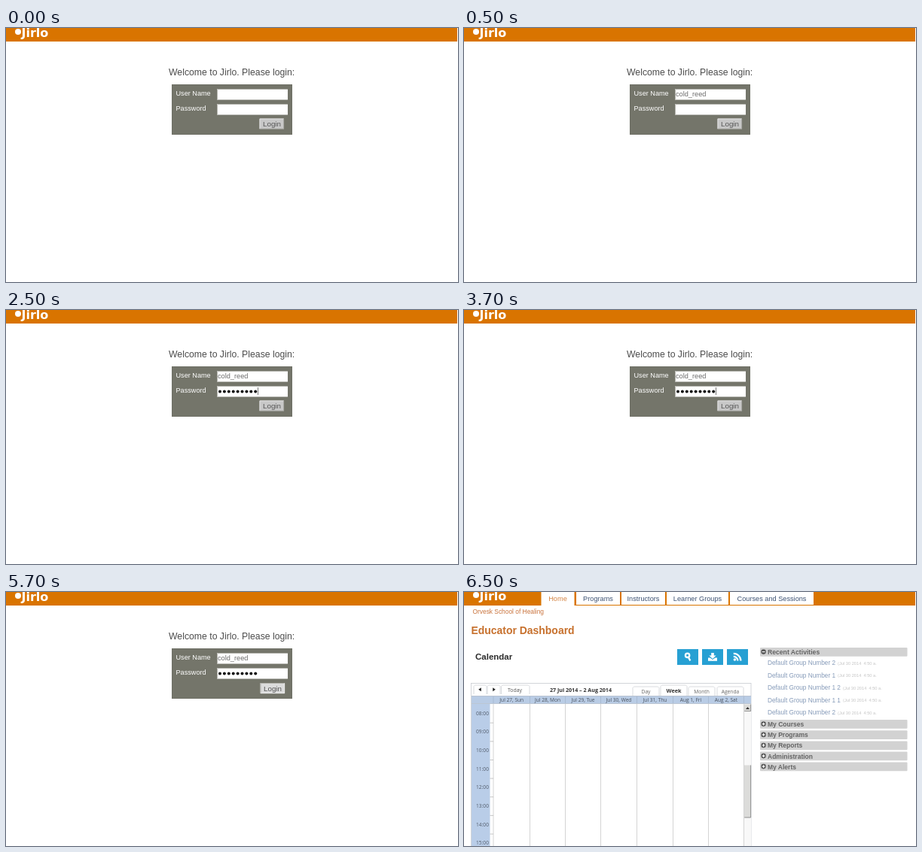
An HTML page that plays this animation: 600 px wide and 338 px high, repeating every 8000 ms.

```html
<!DOCTYPE html>
<html lang="en">
<head>
<meta charset="utf-8">
<title>Login walkthrough</title>
<style>
  html, body { margin: 0; width: 100%; height: 100%; overflow: hidden; background: #fff; }
  svg { display: block; width: 100%; height: 100%; }
  text { font-family: "Liberation Sans", Arial, sans-serif; white-space: pre; }
  .cal { font-family: "Open Sans", Tahoma, sans-serif; }
  .brand { font-family: "DejaVu Sans", Verdana, sans-serif; }
</style>
</head>
<body>
<svg id="stage" viewBox="0 0 600 338" xmlns="http://www.w3.org/2000/svg"></svg>
<script>
const NS = "http://www.w3.org/2000/svg";
const LOOP = 8000;
const stage = document.getElementById("stage");

function add(parent, tag, attrs = {}) {
  const el = document.createElementNS(NS, tag);
  for (const key in attrs) el.setAttribute(key, attrs[key]);
  parent.appendChild(el);
  return el;
}
const group = (parent, attrs) => add(parent, "g", attrs);
const rect = (p, x, y, w, h, fill, more) => add(p, "rect", { x, y, width: w, height: h, fill, ...more });
const path = (p, d, attrs) => add(p, "path", { d, fill: "none", ...attrs });
const line = (p, d, stroke, width = 1) => path(p, d, { stroke, "stroke-width": width });
const dot = (p, cx, cy, r, fill) => add(p, "circle", { cx, cy, r, fill });
function label(p, x, y, size, fill, str, more) {
  const el = add(p, "text", { x, y, "font-size": size, fill, ...more });
  el.textContent = str;
  return el;
}
const BOLD = { "font-weight": 700 };
const MID = { "text-anchor": "middle" };
const CAL = { class: "cal" };

// Shared header
rect(stage, 0, 0, 600, 338, "#fff");
rect(stage, 0, 0, 599, 18, "#d97400");
const brand = group(stage);
dot(brand, 16, 5, 4, "#fff");
label(brand, 20.5, 12, 16, "#fff", "Jirlo", { ...BOLD, class: "brand" });

// Login form
const login = group(stage);
label(login, 216, 63, 12.25, "#4c4c4c", "Welcome to Jirlo. Please login:");
rect(login, 220.5, 75.5, 159, 66, "#74756a", { stroke: "#6f7066" });
label(login, 225.5, 90, 9.15, "#fff", "User Name");
label(login, 225.5, 110, 9.15, "#fff", "Password");

function field(y) {
  rect(login, 280, y, 94, 14.5, "#fff");
  line(login, `M280.5 ${y + 14.5}V${y + 0.5}H374`, "#b4b4ae");
}
field(81);
field(101);

const userText = label(login, 281, 91.3, 9.2, "#6b6b6b", "cold_reed");
const secret = group(login);
for (let i = 0; i < 9; i++) dot(secret, 284 + i * 5.9, 108.6, 2, "#111");
const caret = line(login, "M334.5 103V113", "#555", 0.8);

const button = group(login);
const buttonFace = rect(button, 336.5, 120.5, 32.5, 14, "#c8c8c8");
const buttonLight = line(button, "M337 134V121H368.5", "#e0e0e0");
const buttonDark = line(button, "M337 134.2H368.7V121", "#9a9a94", 0.8);
label(button, 341, 131.3, 9.8, "#555", "Login");

// Dashboard
const dash = group(stage);
const tabs = [
  ["Home", 102.5, 146.5], ["Programs", 149, 207], ["Instructors", 209, 267],
  ["Learner Groups", 269, 351], ["Courses and Sessions", 353, 464]
];
tabs.forEach(([name, x0, x1], i) => {
  rect(dash, x0, 0, x1 - x0, i ? 17 : 18, "#fff");
  label(dash, (x0 + x1) / 2, 12.2, 9.2, i ? "#3d5273" : "#d58545", name, MID);
});
label(dash, 11.5, 28.9, 8.4, "#c9733c", "Orvesk School of Healing");
label(dash, 9.5, 56, 13.95, "#c7702c", "Educator Dashboard", BOLD);
label(dash, 15, 90, 11.5, "#2c2c2c", "Calendar", BOLD);

for (const x of [283, 316, 349]) rect(dash, x, 76, 28, 21, "#27a0d3");
const white = { stroke: "#fff", "stroke-width": 2.3 };
add(dash, "circle", { cx: 296.6, cy: 84.3, r: 2.7, fill: "none", ...white });
path(dash, "M297.8 86.8L300.4 91.4", white);
path(dash, "M328.2 81h3.6v3.6h2.8l-4.6 4.4l-4.6 -4.4h2.8z", { fill: "#fff" });
path(dash, "M324 87.6h2.6l3.4 2.4l3.4 -2.4h2.6v4.2h-12z", { fill: "#fff" });
dot(dash, 359.4, 90, 1.8, "#fff");
path(dash, "M357.8 85.9a5.6 5.6 0 0 1 5.6 5.6M357.8 81.9a9.6 9.6 0 0 1 9.6 9.6", white);

// Calendar toolbar
const colX = [39, 87.5, 134.5, 181.5, 229.5, 277.5, 324.5, 371.5];
rect(dash, 9.5, 121.5, 371.5, 217, "#fff", { stroke: "#c8cbd0", "stroke-width": 0.8 });

function tab(x, y, w, bottom) {
  path(dash, `M${x} ${bottom}V${y + 1.5}l1.5 -1.5H${x + w - 1.5}l1.5 1.5V${bottom}`,
    { fill: "#fff", stroke: "#d0d2d6", "stroke-width": 0.8 });
}
tab(13, 124, 17, 136);
tab(31, 124, 17, 136);
tab(49.5, 124, 37.5, 136);
path(dash, "M22.8 127.2v5l-3.6 -2.5zM38.2 127.2v5l3.6 -2.5z", { fill: "#222" });
label(dash, 67.5, 132.6, 6.9, "#555", "Today", { ...CAL, ...MID });
label(dash, 155, 133.3, 7.1, "#333", "27 Jul 2014 – 2 Aug 2014", { ...CAL, ...MID, ...BOLD });
[["Day", 224], ["Week", 261], ["Month", 298], ["Agenda", 336]].forEach(([name, x]) => {
  const on = name === "Week";
  tab(x, on ? 124 : 126, 35, 138);
  label(dash, x + 17.5, on ? 134 : 135.4, on ? 7.3 : 6.7, on ? "#333" : "#666", name,
    { ...CAL, ...MID, ...(on ? BOLD : {}) });
});

// Calendar grid
rect(dash, 10, 138.5, 371, 9.8, "#b9cce5");
line(dash, "M10 138.5H381M10 148.5H381", "#a9b5c5", 0.7);
const days = ["Jul 27, Sun", "Jul 28, Mon", "Jul 29, Tue", "Jul 30, Wed", "Jul 31, Thu", "Aug 1, Fri", "Aug 2, Sat"];
days.forEach((name, i) =>
  label(dash, (colX[i] + colX[i + 1]) / 2, 145.6, 6.6, "#4a5360", name, { ...CAL, ...MID }));
rect(dash, 10, 149, 24.5, 189, "#b9cde8");
for (const x of colX) {
  line(dash, `M${x} 139V148`, "#a3b4ca", 0.7);
  line(dash, `M${x} 149V338`, "#d4d4d4");
}
for (let i = 0; i < 8; i++) {
  const y = 149.5 + i * 24.65;
  if (i) line(dash, `M34.5 ${y}H39`, "#b8b8b8", 0.8);
  label(dash, 24.5, y + 14.2, 6.6, "#515b69", String(8 + i).padStart(2, "0") + ":00", { ...CAL, ...MID });
}

// Scrollbar
rect(dash, 372, 149, 9, 189, "#f8f8f8");
function raised(y, h) {
  rect(dash, 372, y, 9, h, "#dcdcda");
  line(dash, `M372.3 ${y + h - 0.5}H380.6V${y}`, "#808080", 0.8);
}
raised(149.5, 9.5);
raised(230.5, 70);
path(dash, "M374 156h5l-2.5 -3z", { fill: "#333" });

// Side panels
const panels = [["Recent Activities", 74], ["My Courses", 170], ["My Programs", 184.3],
  ["My Reports", 198.4], ["Administration", 212.5], ["My Alerts", 226.5]];
panels.forEach(([name, y], i) => {
  rect(dash, 393, y, 195.5, 11.8, "#d2d2d2", { rx: 1 });
  dot(dash, 397.6, y + 5.6, 3.3, "#585858");
  line(dash, `M395.7 ${y + 5.6}h3.8` + (i ? "m-1.9 -1.9v3.8" : ""), "#fff", 1.1);
  label(dash, 403, y + 9, i ? 8.5 : 8.65, "#636363", name, BOLD);
});
["2", "1", "1 2", "1 1", "2"].forEach((n, i) => {
  const y = 97 + i * 16.6;
  label(dash, 403, y, 8.28, "#869bb9", "Default Group Number " + n);
  label(dash, n.length > 1 ? 503 : 496, y - 0.5, 5.7, "#c4c4c4", "(Jul 30 2014  4:50 a.");
});

const show = (el, on) => el.setAttribute("visibility", on ? "visible" : "hidden");

function draw(t) {
  const home = t >= 6500;
  const pressed = t >= 4500;
  login.setAttribute("display", home ? "none" : "inline");
  dash.setAttribute("display", home ? "inline" : "none");
  brand.setAttribute("transform", `translate(0 ${home ? -1 : 0})`);
  show(userText, t >= 500);
  show(secret, t >= 2500);
  show(caret, t >= 2500 && !pressed);
  button.setAttribute("transform", pressed ? "translate(1 0.5)" : "");
  buttonFace.setAttribute("fill", pressed ? "#dcdcdc" : "#c8c8c8");
  buttonLight.setAttribute("stroke", pressed ? "#b4b4ae" : "#e0e0e0");
  buttonDark.setAttribute("stroke", pressed ? "#efefef" : "#9a9a94");
}

const start = performance.now();
function tick() {
  draw((performance.now() - start) % LOOP);
  requestAnimationFrame(tick);
}
draw(0);
requestAnimationFrame(tick);
</script>
</body>
</html>
```
